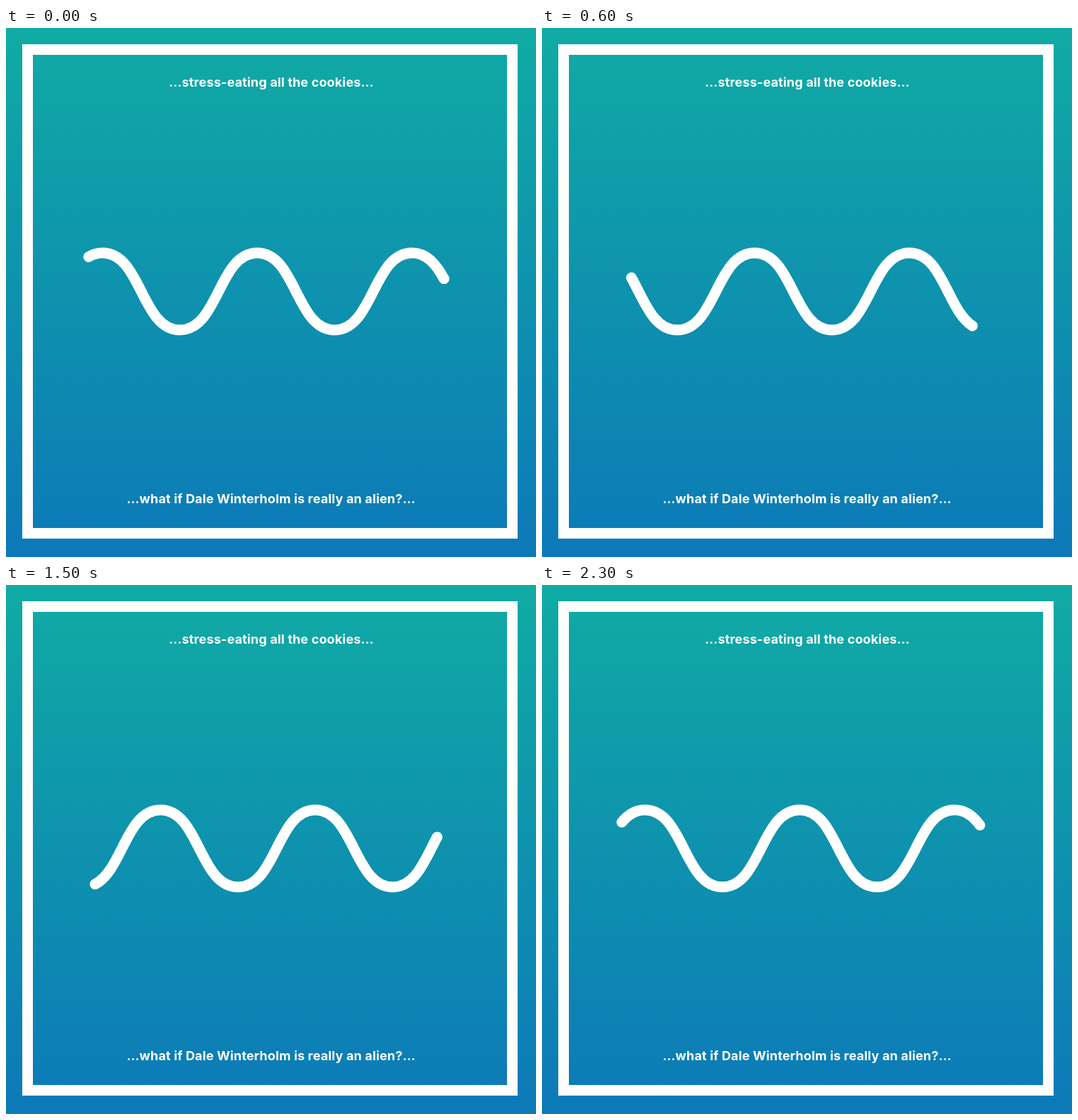
Write an HTML page that moves like this. It is 749 px wide and 748 px high and loops after 2.4 s.

```html
<!DOCTYPE html>
<html lang="en">
<head>
<meta charset="utf-8">
<style>
  html, body { margin: 0; width: 100%; height: 100%; overflow: hidden; }
  svg { display: block; width: 749px; height: 748px; background: linear-gradient(#10aba4, #0c79b8); }
  .line { fill: none; stroke: #fff; stroke-width: 15; }
  text { font: 700 18px Inter, sans-serif; letter-spacing: .15px; fill: #fff; text-anchor: middle; }
</style>
</head>
<body>
<svg viewBox="0 0 749 748">
  <rect class="line" x="30.5" y="30.5" width="685" height="684"/>
  <text x="375" y="83">…stress-eating all the cookies…</text>
  <text x="374.5" y="672">…what if Dale Winterholm is really an alien?…</text>
  <path id="wave" class="line" stroke-linecap="round"/>
</svg>
<script>
  const LOOP = 2400, STEP = 100;
  const HALF = 109.3, HEIGHT = 109;
  const START = 142.2, LENGTH = 734.3, CRAWL = 0.1341; // along the path, px and px/ms
  const wave = document.getElementById('wave');

  // A half wave runs level-to-level between trough and crest
  const half = dy => `c${HALF / 2} 0 ${HALF / 2} ${dy} ${HALF} ${dy}`;
  wave.setAttribute('d', 'M27.2 427' + (half(-HEIGHT) + half(HEIGHT)).repeat(4));
  wave.setAttribute('stroke-dasharray', `${LENGTH} 3000`);

  // The wave slides left while its visible stretch crawls right along it
  function draw(now) {
    const t = Math.floor(now % LOOP / STEP) * STEP;
    wave.setAttribute('transform', `translate(${-2 * HALF * t / LOOP} 0)`);
    wave.setAttribute('stroke-dashoffset', -(START + CRAWL * t));
    requestAnimationFrame(draw);
  }
  draw(performance.now());
</script>
</body>
</html>
```
